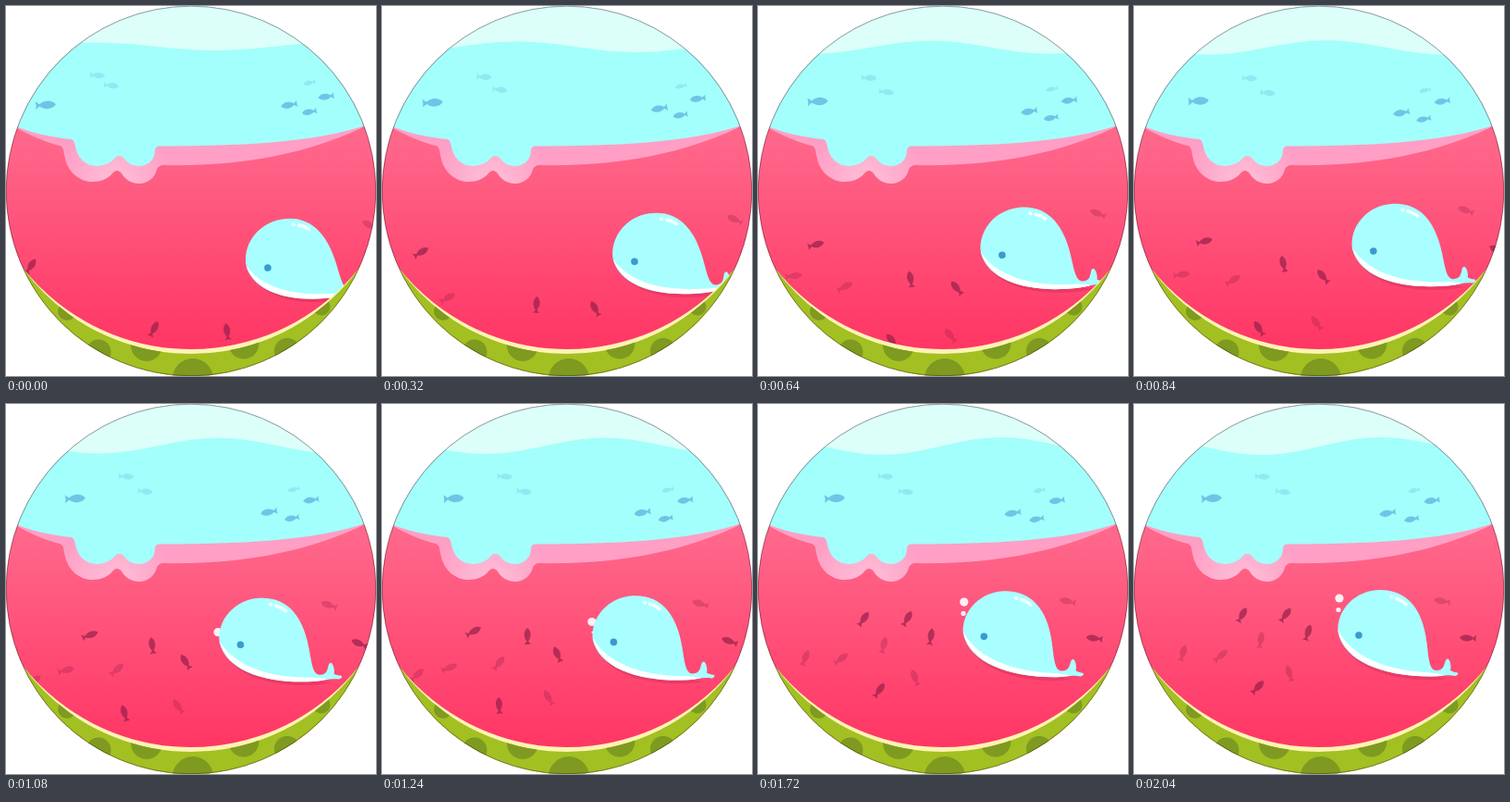
These frames come from a looping animation (400 px wide and 400 px high, 2080 ms). An HTML page with a canvas:

```html
<!DOCTYPE html>
<html lang="en">
<head>
<meta charset="utf-8">
<title>Watermelon sea</title>
<style>
html, body { margin: 0; width: 100%; height: 100%; overflow: hidden; background: #fff; }
canvas { display: block; width: 400px; height: 400px; }
</style>
</head>
<body>
<canvas id="stage" width="400" height="400"></canvas>
<script>
const g = document.getElementById('stage').getContext('2d');
const LOOP = 2080, STEP = 40;

// Share of a move still to go at u = 0..1; a larger hold gives a slower start.
const left = (u, hold) => (1 - u) ** 2 * (1 + hold * u);
const mix = (from, to, rest) => to + (from - to) * rest;

const BLUE = '#6fc4e6', PALE = '#8eeaf2';
// Sea fish: colour, size, hold, start, drift.
const seaFish = [
  [BLUE, 1.1, 0, 43, 107, 41, -5],
  [PALE, .82, 0, 99, 75, 40, 3.5],
  [PALE, .82, 0, 114, 86, 47, 9],
  [BLUE, .9, .85, 306, 107, -32, 11],
  [BLUE, .8, .85, 328, 114.5, -28, 10],
  [BLUE, .86, .85, 346, 98, -24, 6.5],
  [PALE, .65, .85, 328, 83, -25, 10.5]
];

// Each melon fish swims along one cubic curve.
const darkFish = [
  [27, 281, 49, 247, 97, 264, 117, 228],
  [160, 349, 183, 305, 142, 257, 164, 228],
  [239, 352, 232, 305, 177, 283, 188, 247],
  [190, 402, 148, 370, 110, 332, 134, 306],
  [430, 282, 409, 274, 380, 254, 361, 253]
];
const faintFish = [
  [393, 237, 375, 226, 345, 215, 333, 213],
  [50, 330, 85, 300, 130, 300, 137, 255],
  [-10, 302, 38, 285, 63, 299, 94, 272],
  [-30, 320, -15, 312, 40, 312, 53, 269],
  [240, 395, 217, 365, 180, 329, 168, 291]
];

const fishShape = new Path2D('M10 0C6-5-1-5-6-1L-10-4Q-9 0-10 4L-6 1C-1 5 6 5 10 0Z');
const band = new Path2D('M8 130C28 141 45 148 58 151C63 153 62 157 63 161C66 180 80 190 93 190C105 190 112 185 115 181C118 177 122 177 125 181C129 188 136 192 144 192C154 192 161 185 163 177C164 174 167 172 171 172C245 174 325 162 392 128V0H0V130Z');
const sea = new Path2D('M10 130C30 138 50 142 70 144C74 145 74 148 75 152C77 164 86 173 98 173C107 173 114 169 117 165C120 161 125 161 128 165C131 170 137 173 144 173C154 173 161 166 161 156C161 153 163 151.5 166 151.5C250 151 330 149 392 128V0H0V130Z');

// The whale is drawn around its eye at (243, 250).
const body = new Path2D('M220.5 246C219 222 240 201 266 201C296 201 314 222 317.5 266C319 281 321 288 327 288C335 288 335 282 337 277Q340 273 342 280Q343 285 342 288Q346 290 350 290.5Q351 293 347 294C338 292 331 294.5 322 294.5C272 295 226 279 220.5 246Z');
const belly = new Path2D('M220.5 244C230 264 258 288 322 290.5L336 293Q328 294.5 322 294.5C272 295 226 279 220.5 244Z');

const flesh = g.createLinearGradient(0, 140, 0, 370);
flesh.addColorStop(0, '#ff688b');
flesh.addColorStop(1, '#ff3664');
const glow = g.createRadialGradient(118, 192, 5, 118, 192, 62);
glow.addColorStop(0, '#ffbdd7');
glow.addColorStop(1, '#ff9fc5');

function fill(path, color) { g.fillStyle = color; g.fill(path); }

function disc(x, y, r, color) {
  g.fillStyle = color;
  g.beginPath();
  g.arc(x, y, r, 0, 2 * Math.PI);
  g.fill();
}

function fish(x, y, angle, size, color) {
  g.save();
  g.translate(x, y);
  g.rotate(angle);
  g.scale(size, size);
  fill(fishShape, color);
  g.restore();
}

function drawSea(u) {
  fill(band, glow);
  g.save();
  g.clip(sea);
  g.fillStyle = '#a3fffb';
  g.fillRect(0, 0, 400, 200);

  const rest = left(u, 0);
  const crest = mix(97, 267, rest), height = mix(4.2, 9.5, rest);
  g.fillStyle = '#dcfff9';
  g.beginPath();
  g.moveTo(0, 0);
  for (let x = 0; x <= 400; x += 4)
    g.lineTo(x, 36 + 3.5 * rest + height * (1 - Math.cos((x - crest) * Math.PI / 129)));
  g.lineTo(400, 0);
  g.fill();

  for (const [color, size, hold, x, y, dx, dy] of seaFish) {
    const rest = left(u, hold);
    fish(x + dx * (1 - rest), y + dy * (1 - rest * rest), Math.atan2(dy / 2, dx), size, color);
  }
  g.restore();
}

function swim([x0, y0, x1, y1, x2, y2, x3, y3], u, color) {
  const q = left(u, .85), s = 1 - q;
  const at = (a, b, c, d) => a * q ** 3 + 3 * b * q * q * s + 3 * c * q * s * s + d * s ** 3;
  const slope = (a, b, c, d) => (b - a) * q * q + 2 * (c - b) * q * s + (d - c) * s * s;
  const angle = Math.atan2(slope(y0, y1, y2, y3), slope(x0, x1, x2, x3));
  fish(at(x0, x1, x2, x3), at(y0, y1, y2, y3), angle, .9, color);
}

// A bubble leaves the mouth at time begin and slows down as it rises.
function bubble(u, begin, x0, y0, x1, y1, r) {
  if (u <= begin) return;
  const v = (u - begin) / (1 - begin), rest = left(v, 0);
  disc(mix(x0, x1, rest), mix(y0, y1, rest), r * Math.min(1, v * 8), '#fff0f5');
}

function drawWhale(u) {
  bubble(u, .44, 232, 262, 222, 210, 4.6);
  bubble(u, .59, 228, 249, 221, 222.5, 2.6);

  g.save();
  g.translate(mix(283, 243, left(u, .35)), mix(283, 250, left(u, .75)));
  g.rotate(-10 * left(u, 1.2) * Math.PI / 180);
  g.translate(-243, -250);
  g.save();
  g.translate(2, 4);
  fill(belly, 'rgba(200,35,85,.35)');
  g.restore();
  fill(body, '#a9ffff');
  fill(belly, '#fff');
  disc(243, 250, 3.8, '#3a9ad0');
  g.lineCap = 'round';
  g.strokeStyle = '#f2ffff';
  g.lineWidth = 3.6;
  g.beginPath();
  g.moveTo(278, 208.5);
  g.lineTo(279, 209);
  g.moveTo(284, 210.5);
  g.quadraticCurveTo(290, 212.5, 294, 216.5);
  g.stroke();
  g.restore();
}

// Area under an arc that meets the melon's edge at (18, 283) and (382, 283).
function rindBelow(bottom) {
  const p = new Path2D(), h = bottom - 283, r = (182 ** 2 + h * h) / (2 * h);
  const half = Math.asin(182 / r);
  p.arc(200, bottom - r, r, Math.PI / 2 - half, Math.PI / 2 + half);
  p.lineTo(0, 283);
  p.lineTo(0, 400);
  p.lineTo(400, 400);
  p.lineTo(400, 283);
  p.closePath();
  return p;
}
const cream = rindBelow(371), rind = rindBelow(376);
const spots = [[66, 330, 10], [100, 374, 13.5], [152, 367, 17], [202, 403, 22],
  [257, 365, 16.5], [304, 373, 14], [341, 325, 9.5]];

function drawRind() {
  fill(cream, '#fff3b4');
  fill(rind, '#a2c022');
  g.save();
  g.clip(rind);
  for (const [x, y, r] of spots) disc(x, y, r, '#7f9a20');
  g.restore();
}

function draw(now) {
  const u = Math.floor(now % LOOP / STEP) * STEP / (LOOP - STEP);
  g.clearRect(0, 0, 400, 400);
  g.save();
  g.beginPath();
  g.arc(200, 200, 200, 0, 2 * Math.PI);
  g.clip();
  g.fillStyle = flesh;
  g.fillRect(0, 0, 400, 400);
  drawSea(u);
  for (const path of darkFish) swim(path, u, 'rgba(148,32,74,.7)');
  for (const path of faintFish) swim(path, u, 'rgba(148,32,74,.3)');
  drawWhale(u);
  drawRind();
  g.restore();
  g.strokeStyle = 'rgba(0,0,0,.5)';
  g.lineWidth = .7;
  g.beginPath();
  g.arc(200, 200, 199.8, 0, 2 * Math.PI);
  g.stroke();
}

let start;
function tick(now) {
  start ??= now;
  draw(now - start);
  requestAnimationFrame(tick);
}
draw(0);
requestAnimationFrame(tick);
</script>
</body>
</html>
```
